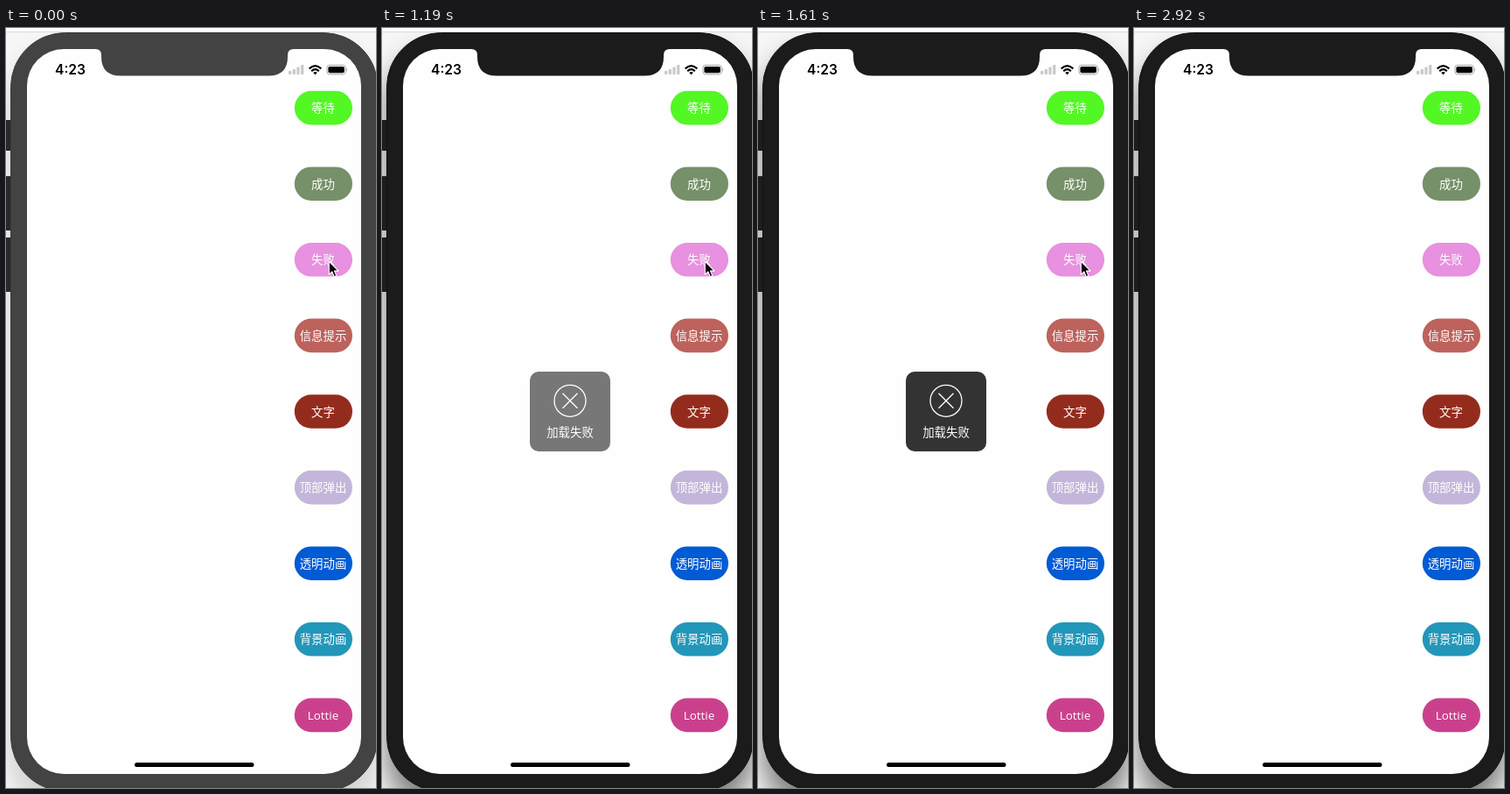
An HTML page that plays this animation: 423x867 px, repeating every 3.38 s.

```html
<!DOCTYPE html>
<html lang="zh-CN">
<head>
<meta charset="utf-8">
<title>提示动画</title>
<style>
  html, body { margin: 0; width: 100%; height: 100%; overflow: hidden; background: #f5f5f5; }
  svg { display: block; width: 423px; height: 867px; }
  text { fill: #fff; font: 13.4px "Noto Sans CJK SC", "Noto Sans CJK", sans-serif; text-anchor: middle; }
  .latin { font: 13.4px "Open Sans", "Noto Sans", sans-serif; }
  .clock { fill: #000; font: 600 15.6px Inter, sans-serif; text-anchor: start; }
  #body { fill: #434343; }
</style>
</head>
<body>
<svg viewBox="0 0 423 867" xmlns="http://www.w3.org/2000/svg">
  <defs>
    <filter id="blur" x="-20%" y="-20%" width="140%" height="140%"><feGaussianBlur stdDeviation="15"/></filter>
    <clipPath id="below"><rect y="5" width="423" height="862"/></clipPath>
  </defs>

  <rect width="423" height="867" fill="#f6f6f6"/>
  <rect width="423" height="4" fill="#fdfdfd"/>
  <rect y="4" width="423" height="1" fill="#dadada"/>
  <g clip-path="url(#below)">
    <rect id="shadow" x="5" y="27" width="420" height="866" rx="62" filter="url(#blur)" opacity=".16"/>
  </g>

  <g id="keys" fill="#292929">
    <rect x="-4" y="105" width="10" height="35" rx="1"/>
    <rect x="-4" y="169" width="10" height="62" rx="1"/>
    <rect x="-4" y="239" width="10" height="62" rx="1"/>
  </g>
  <rect id="body" x="5.5" y="5.5" width="419.5" height="865" rx="62" stroke="#3a3a3a"/>
  <rect x="24" y="24" width="382" height="827" rx="42" fill="#fefefe"/>
  <path id="notch" fill="#434343" d="M102 23V24Q109 24 109 31V33Q109 54.500 131 54.500H300Q322 54.500 322 33V31Q322 24 329 24V23Z"/>

  <text class="clock" x="56" y="53">4:23</text>
  <g fill="#c9c9cb">
    <rect x="323" y="49" width="3.200" height="4" rx=".7"/>
    <rect x="327.700" y="47" width="3.200" height="6" rx=".7"/>
    <rect x="332.400" y="44.500" width="3.200" height="8.500" rx=".7"/>
    <rect x="337.100" y="42" width="3.200" height="11" rx=".7"/>
  </g>
  <g fill="none" stroke="#000" stroke-width="2.200">
    <path d="M346.700 46.400Q353.500 40 360.300 46.400"/>
    <path d="M349.200 49.200Q353.500 45.200 357.800 49.200"/>
    <path d="M351.200 50.900Q353.500 49.200 355.800 50.900L353.500 53.200Z" fill="#000" stroke="none"/>
  </g>
  <rect x="366.900" y="42.400" width="21.400" height="10.400" rx="3" fill="none" stroke="#a5a5a5"/>
  <rect x="368.400" y="43.900" width="18.400" height="7.400" rx="1.700"/>
  <path d="M389.400 45.700Q391.300 47.600 389.400 49.500Z" fill="#a5a5a5"/>
  <rect x="147" y="838" width="136.500" height="5" rx="2.500"/>

  <g id="buttons"></g>

  <g id="toast" opacity="0">
    <rect x="169" y="392" width="92" height="91" rx="10" fill="#333"/>
    <g fill="none" stroke="#fff" stroke-width="1.300">
      <circle cx="215" cy="425.300" r="18"/>
      <path d="M206.500 416.800l17 17m0-17l-17 17"/>
    </g>
    <text x="215" y="466">加载失败</text>
  </g>

  <path id="cursor" d="M369.300 266.300V281.300L372.800 278L375.200 283.700L377.800 282.600L375.400 277.100H380Z"
        stroke="#fff" stroke-width="1.100" stroke-linejoin="round"/>
</svg>
<script>
  const LOOP = 3380;
  const PRESS = 1040, RELEASE = 1190, SHOWN = 1340, CURSOR_GONE = 1790, HIDDEN = 2230;
  const BUTTONS = [
    ['等待', '#52f724'], ['成功', '#769069'], ['失败', '#e791e0'],
    ['信息提示', '#bd625c'], ['文字', '#942c1e'], ['顶部弹出', '#c3b6da'],
    ['透明动画', '#005bd5'], ['背景动画', '#2397b9'], ['Lottie', '#cb408d']
  ];
  const $ = id => document.getElementById(id);

  function add(parent, tag, attrs, label = '') {
    const el = document.createElementNS('http://www.w3.org/2000/svg', tag);
    for (const name in attrs) el.setAttribute(name, attrs[name]);
    el.textContent = label;
    parent.append(el);
    return el;
  }

  const pills = BUTTONS.map(([label, fill], i) => {
    const y = 71.8 + i * 86.6;
    const pill = add($('buttons'), 'rect', { x: 329.8, y, width: 66.2, height: 38.6, rx: 19.3, fill });
    add($('buttons'), 'text', { x: 362.5, y: y + 24.4, class: label === 'Lottie' ? 'latin' : '' }, label);
    return pill;
  });

  // Each step holds its value until the next one.
  function hold(el, property, steps) {
    const frames = steps.map(([time, value]) => ({ offset: time / LOOP, [property]: value, easing: 'step-end' }));
    frames.push({ offset: 1, [property]: steps.at(-1)[1] });
    el.animate(frames, { duration: LOOP, iterations: Infinity });
  }

  hold($('body'), 'fill', [[0, '#434343'], [PRESS, '#1b1b1b']]);
  hold($('body'), 'stroke', [[0, '#3a3a3a'], [PRESS, '#111']]);
  hold($('notch'), 'fill', [[0, '#434343'], [PRESS, '#1b1b1b']]);
  hold($('keys'), 'fill', [[0, '#292929'], [PRESS, '#1d1d1d']]);
  hold($('shadow'), 'opacity', [[0, .16], [PRESS, .5]]);
  hold(pills[2], 'fill', [[0, '#e791e0'], [PRESS, '#7b4f77'], [RELEASE, '#e791e0']]);
  hold($('toast'), 'opacity', [[0, 0], [RELEASE, .67], [SHOWN, 1], [HIDDEN, 0]]);
  hold($('cursor'), 'opacity', [[0, 1], [CURSOR_GONE, 0]]);
</script>
</body>
</html>
```
